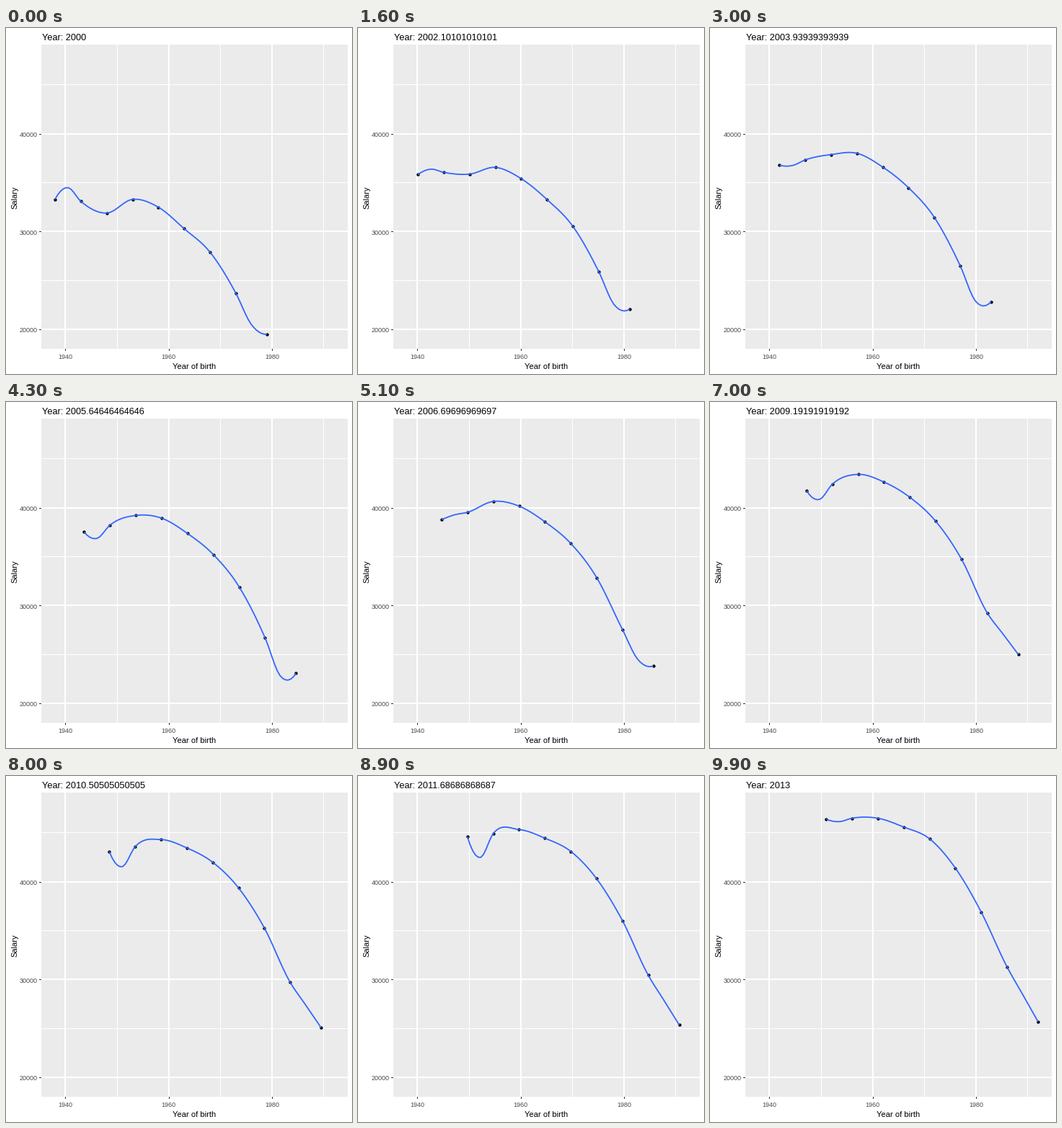
Recreate the animation shown at these times as a matplotlib script. Size 480 px wide and 480 px high, loop 10 s.

```python
import numpy as np
import matplotlib.pyplot as plt
from matplotlib.animation import FuncAnimation
from matplotlib.patches import Rectangle

SIZE, FRAMES, SPAN = 480, 100, 13
LEFT, TOP, RIGHT, BOTTOM = 49, 23, 474, 445

# Salary (thousands) per age group, oldest first: first year, last year,
# and how far the path between them bows upwards
START = np.array([33.3, 33.1, 31.9, 33.3, 32.5, 30.3, 27.9, 23.7, 19.5])
END = np.array([46.4, 46.5, 46.5, 45.6, 44.4, 41.4, 36.9, 31.3, 25.7])
BOW = np.array([-1.5, -.7, 1, .3, -.3, .1, .1, -.3, .9])
BIRTH = np.append(np.arange(1938, 1974, 5), 1979)

plt.rcParams["font.family"] = "Liberation Sans"


def px(year):
    return 82.3 + 7.17 * (year - 1940)


def py(salary):
    return 146.8 - 13.57 * (salary - 40)


def salaries(t):
    p = t / SPAN
    boom = 1.6 * (1 - p) * np.sin(np.pi * t / 5.65) ** 2
    return START + (END - START) * p + BOW * np.sin(np.pi * p) + boom


def hooks(t):
    """Swing of the curve off the chord in its first and last interval."""
    head = np.interp(t, [0, 5.65, 7.75, 9.2, 11.7, 13],
                     [1.3, -1, 1.25, -1.25, -2.3, -.3])
    tail = -(1.1 + .18 * t) * np.clip((7.75 - t) / 2, 0, 1)
    return head, tail


def smooth(x, y, at):
    """Cubic Hermite curve with parabolic slopes."""
    m = np.gradient(y, x, edge_order=2)
    i = np.clip(np.searchsorted(x, at, side="right") - 1, 0, len(x) - 2)
    h = x[i + 1] - x[i]
    t = (at - x[i]) / h
    s = 1 - t
    return (s * s * (1 + 2 * t) * y[i] + t * t * (3 - 2 * t) * y[i + 1]
            + h * t * s * (s * m[i] - t * m[i + 1]))


def with_hooks(v, head=0, tail=0):
    """Insert a point halfway along the first and last interval."""
    return np.insert(v.astype(float), [1, len(v) - 1],
                     [v[:2].mean() + head, v[-2:].mean() + tail])


fig = plt.figure(figsize=(SIZE / 72, SIZE / 72), dpi=72, facecolor="white")
ax = fig.add_axes([0, 0, 1, 1])
ax.set(xlim=(0, SIZE), ylim=(SIZE, 0))
ax.axis("off")


def box(x, y, w, h, color="white"):
    ax.add_patch(Rectangle((x, y), w, h, fc=color, lw=0, antialiased=False))


def label(x, y, text, size, color="black", **kw):
    return ax.text(x, y, text, size=size, color=color, va="baseline", **kw)


width, height = RIGHT - LEFT, BOTTOM - TOP
box(LEFT, TOP, width, height, "#EBEBEB")
for k in range(3):
    year, salary = 1940 + 20 * k, 40 - 10 * k
    x, y = round(px(year)), round(py(salary))
    box(int(px(year + 10)), TOP, 1, height)
    box(LEFT, int(py(salary + 5)), width, 1)
    box(x - 1, TOP, 2, height)
    box(LEFT, y - 1, width, 2)
    box(x, BOTTOM, 1, 3, "#333333")
    box(LEFT - 3, y, 3, 1, "#333333")
    label(px(year), 459, str(year), 9, "#4D4D4D", ha="center")
    label(44, py(salary) + 4.2, f"{salary}000", 9, "#4D4D4D", ha="right")

label((LEFT + RIGHT) / 2, 473, "Year of birth", 11.1, ha="center")
label(15, (TOP + BOTTOM) / 2 + 1, "Salary", 11.1, ha="center",
      rotation=90, rotation_mode="anchor")
title = label(49.5, 17, "", 12.75)

dots, = ax.plot([], [], "o", color="black", ms=4.4, mew=0)
curve, = ax.plot([], [], color="#3366FF", lw=1.8, solid_capstyle="butt")


def draw(step):
    t = SPAN * step / (FRAMES - 1)
    birth, pay = BIRTH + t, salaries(t)
    at = np.linspace(birth[0], birth[-1], 80)
    line = smooth(with_hooks(birth), with_hooks(pay, *hooks(t)), at)
    dots.set_data(px(birth), py(pay))
    curve.set_data(px(at), py(line))
    title.set_text(f"Year: {2000 + t:.15g}")
    return dots, curve, title


anim = FuncAnimation(fig, draw, frames=FRAMES, interval=100,
                     repeat=True, repeat_delay=0)
plt.show()
```
